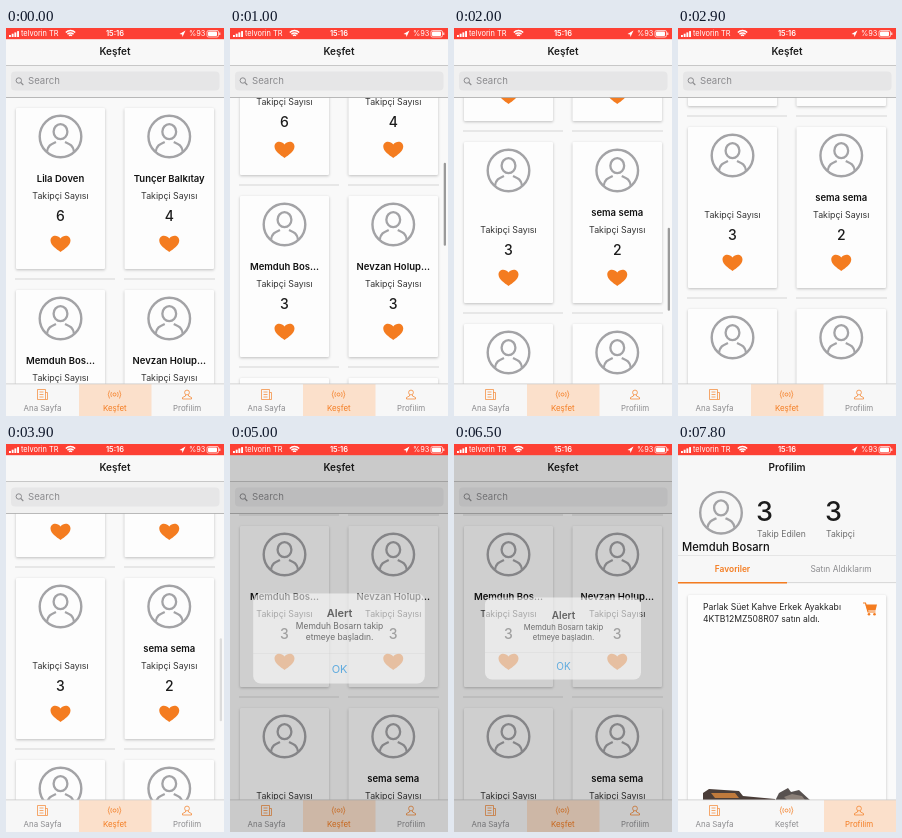
Write an HTML page with a canvas that moves like this. It is 218 px wide and 388 px high and loops after 8 s.

```html
<!DOCTYPE html>
<html lang="tr">
<head>
<meta charset="utf-8">
<title>Keşfet</title>
<style>
html, body { margin: 0; width: 100%; height: 100%; overflow: hidden; background: #f9f9f9; }
canvas { display: block; width: 218px; height: 388px; }
</style>
</head>
<body>
<canvas id="stage"></canvas>
<script>
const W = 218, H = 388, LOOP = 8000, STEP = 100;
const PITCH = 182, CARD_TOP = 80, CARD_H = 161;
const ORANGE = '#f47c20', GRAY = '#8b8b8e', INK = '#1c1c1c', RING = '#a3a3a6';
const SWITCH = 7300;
const USER = 'Memduh Bosarn';

const canvas = document.getElementById('stage');
const c = canvas.getContext('2d');
const ratio = window.devicePixelRatio || 1;
canvas.width = W * ratio;
canvas.height = H * ratio;

const rows = [
  [['Lila Doven', 6], ['Tunçer Balkıtay', 4]],
  [['Memduh Bos...', 3], ['Nevzan Holup...', 3]],
  [['', 3], ['sema sema', 2]],
  [['', 2], ['', 2]],
  [['', 1], ['', 1]]
];

// time, scroll offset
const scrollKeys = [[0, 0], [200, 0], [1000, 94], [1500, 226], [2000, 330], [2400, 345],
  [3100, 345], [3900, 310], [4600, 180], [LOOP, 180]];
const barKeys = [[0, 0], [200, 0], [300, 1], [2500, 1], [2800, 0], [3200, 0], [3400, 0.3],
  [4400, 0.3], [4600, 0], [LOOP, 0]];

const clamp = (v) => Math.min(1, Math.max(0, v));

function segment(keys, t) {
  let i = 0;
  while (i < keys.length - 2 && t >= keys[i + 1][0]) i++;
  return i;
}

function linear(keys, t) {
  const i = segment(keys, t), [t0, a] = keys[i], [t1, b] = keys[i + 1];
  return a + (b - a) * clamp((t - t0) / (t1 - t0));
}

// Hermite curve whose tangents never overshoot the keys
function smooth(keys, t) {
  const slope = (i) => (keys[i + 1][1] - keys[i][1]) / (keys[i + 1][0] - keys[i][0]);
  const tangent = (i) => {
    if (i === 0 || i === keys.length - 1) return 0;
    const a = slope(i - 1), b = slope(i);
    return a * b <= 0 ? 0 : 2 * a * b / (a + b);
  };
  const i = segment(keys, t), [t0, a] = keys[i], [t1, b] = keys[i + 1];
  const d = t1 - t0, u = clamp((t - t0) / d), v = 1 - u;
  return a * v * v * (1 + 2 * u) + b * u * u * (3 - 2 * u) +
    d * u * v * (v * tangent(i) - u * tangent(i + 1));
}

function rect(x, y, w, h, color) {
  c.fillStyle = color;
  c.fillRect(x, y, w, h);
}

function round(x, y, w, h, r, color) {
  c.fillStyle = color;
  c.beginPath();
  c.roundRect(x, y, w, h, r);
  c.fill();
}

function text(s, x, y, size, color, align = 'center', weight = 400) {
  c.font = `${weight} ${size}px Inter, "Open Sans", sans-serif`;
  c.fillStyle = color;
  c.textAlign = align;
  c.textBaseline = 'alphabetic';
  c.fillText(s, x, y + size * 0.36);
}

function path(d, x, y, color, width) {
  const p = new Path2D(d);
  c.save();
  c.translate(x, y);
  if (width) {
    c.strokeStyle = color;
    c.lineWidth = width;
    c.stroke(p);
  } else {
    c.fillStyle = color;
    c.fill(p);
  }
  c.restore();
}

function ring(x, y, rx, color, width, ry = rx) {
  c.strokeStyle = color;
  c.lineWidth = width;
  c.beginPath();
  c.ellipse(x, y, rx, ry, 0, 0, Math.PI * 2);
  c.stroke();
}

function avatar(x, y) {
  ring(x, y, 20.8, RING, 2.4);
  ring(x, y - 4.8, 6.9, RING, 2.3, 7.5);
  path('M-13.5 15C-12.5 8.5 -9 7.5 -4.5 5.5M13.5 15C12.5 8.5 9 7.5 4.5 5.5', x, y, RING, 2.3);
}

function heart(x, y) {
  path('M0 8.5C-4 5.5 -10 2 -10 -3C-10 -8.8 -3 -9.3 0 -5' +
    'C3 -9.3 10 -8.8 10 -3C10 2 4 5.5 0 8.5Z', x, y, ORANGE);
}

function panel(x, y, w, h) {
  c.save();
  c.shadowColor = 'rgba(0,0,0,.24)';
  c.shadowBlur = 3 * ratio;
  c.shadowOffsetY = ratio;
  round(x, y, w, h, 1, '#fdfdfd');
  c.restore();
}

function card(x, y, w, [name, count]) {
  const mid = x + w / 2;
  panel(x, y, w, CARD_H);
  avatar(mid, y + 28.5);
  text(name, mid, y + 70.3, 9.5, '#111', 'center', 600);
  text('Takipçi Sayısı', mid, y + 88, 8.8, '#333');
  text(count, mid, y + 108, 14, INK, 'center', 500);
  heart(mid, y + 135.5);
}

function statusBar() {
  rect(0, 0, W, 11.2, '#fd4034');
  for (let i = 0; i < 4; i++) rect(3 + i * 2.7, 7 - i * 1.3, 1.9, 2 + i * 1.3, '#fff');
  text('telvorin TR', 15, 5.6, 7.4, '#fff', 'left');
  for (const r of [2, 4.3, 6.6]) {
    c.strokeStyle = '#fff';
    c.lineWidth = 1.5;
    c.beginPath();
    c.arc(64.5, 9.2, r, -Math.PI * 0.75, -Math.PI * 0.25);
    c.stroke();
  }
  text('15:16', 109, 5.6, 7.5, '#fff', 'center', 600);
  path('M0 3.5L6 0L3 6.5L2.6 4Z', 173.5, 2.5, '#fff');
  text('%93', 183, 5.6, 7.4, '#fff', 'left');
  c.strokeStyle = '#fff';
  c.lineWidth = 0.7;
  c.beginPath();
  c.roundRect(201, 2.5, 11.5, 6.5, 1.5);
  c.stroke();
  round(202, 3.5, 9, 4.5, 0.8, '#fff');
  rect(213.3, 4.5, 1, 2.5, '#fff');
}

function tabBar(active) {
  rect(0, 356, W, 32, '#f7f7f7');
  rect(active * 73, 356, active === 1 ? 72.5 : 73, 32, '#fbe0cb');
  rect(0, 355.5, W, 0.8, '#c9c9c9');
  ['Ana Sayfa', 'Keşfet', 'Profilim'].forEach((label, i) =>
    text(label, 36.5 + i * 72.3, 380, 7.9, i === active ? ORANGE : GRAY));

  path('M-5 -5H3V5H-5ZM3 -2H5V5H3M-3 -2.5H1M-3 0H1M-3 2.5H1', 36.5, 366.5, ORANGE, 0.65);
  ring(108.5, 366.5, 1.5, ORANGE, 0.8);
  path('M-3 -2.5Q-4.5 0 -3 2.5M3 -2.5Q4.5 0 3 2.5' +
    'M-5 -4Q-7.5 0 -5 4M5 -4Q7.5 0 5 4', 108.5, 366.5, ORANGE, 0.7);
  ring(181, 364.5, 2.4, ORANGE, 0.7);
  path('M-1.5 2V3L-4.5 4.5V6H4.5V4.5L1.5 3V2', 181, 365, ORANGE, 0.7);
}

function explore(t) {
  const scroll = smooth(scrollKeys, t);
  rect(0, 0, W, H, '#f9f9f9');
  rows.forEach((pair, i) => {
    const y = CARD_TOP + i * PITCH - scroll;
    if (y > H || y + PITCH < 60) return;
    card(10, y, 89, pair[0]);
    card(118.5, y, 89.5, pair[1]);
    rect(9, y + 170.5, 100, 1, '#d6d6d6');
    rect(118, y + 170.5, 91, 1, '#d6d6d6');
  });
  const bar = linear(barKeys, t);
  if (bar) round(213.7, 109 + scroll * 0.275, 2.3, 83, 1.1, `rgba(0,0,0,${bar * 0.38})`);

  rect(0, 11, W, 27, '#f8f8f8');
  rect(0, 37, W, 0.8, '#bcbcbc');
  text('Keşfet', 109, 23.3, 10, INK, 'center', 600);
  rect(0, 38, W, 31, '#f1f1f1');
  round(5, 43.5, 208.5, 19, 4, '#e6e6e7');
  ring(12.8, 52.5, 2.7, GRAY, 1);
  path('M0 0L2.5 2.5', 14.8, 54.5, GRAY, 1.1);
  text('Search', 22, 53, 9.6, GRAY, 'left');
  rect(0, 69, W, 0.9, '#b2b2b2');
  tabBar(1);
}

function dialog(t) {
  const enter = clamp((t - 4800) / 400);
  const fade = enter * (1 - clamp((t - 6300) / 400));
  if (!fade) return;
  rect(0, 0, W, H, `rgba(0,0,0,${fade * 0.37})`);
  const scale = 1.2 - 0.2 * enter;
  c.save();
  c.globalAlpha = 1 - (1 - fade) ** 1.4;
  c.translate(109, 194.5);
  c.scale(scale, scale);
  c.translate(-109, -194.5);
  round(31, 153.5, 156, 82, 7, 'rgba(252,252,252,.97)');
  text('Alert', 109.5, 171, 10, '#111', 'center', 600);
  text(USER + ' takip', 109.5, 183.3, 7.7, '#222');
  text('etmeye başladın.', 109.5, 193.3, 7.7, '#222');
  rect(31, 208, 156, 0.5, '#cfcfd1');
  text('OK', 109.5, 222, 10, '#0a84d8');
  c.restore();
}

function cart(x, y) {
  path('M-7 -6H-4.5L-2 3H5.5', x, y, ORANGE, 1.2);
  path('M-4.5 -4.5H7L5.5 1.5H-2.5Z', x, y, ORANGE);
  for (const dx of [-1, 4.5]) {
    c.fillStyle = ORANGE;
    c.beginPath();
    c.arc(x + dx, y + 5.3, 1.3, 0, Math.PI * 2);
    c.fill();
  }
}

function profile() {
  rect(0, 0, W, H, '#fafafa');
  rect(0, 11, W, 128, '#f7f7f7');
  text('Profilim', 109, 23, 10, INK, 'center', 600);
  avatar(43, 68.7);
  for (const [x, label] of [[79, 'Takip Edilen'], [148, 'Takipçi']]) {
    text(3, x + 7.5, 67, 27, INK, 'center', 500);
    text(label, x, 90.3, 8.6, '#6d6d6d', 'left');
  }
  text(USER, 4, 103.3, 11.2, '#111', 'left', 500);
  rect(0, 111, W, 0.7, '#dedede');
  text('Favoriler', 54.5, 125, 8.4, ORANGE, 'center', 600);
  text('Satın Aldıklarım', 163, 125, 8.4, GRAY);
  rect(0, 138.3, W, 0.8, '#cfcfcf');
  rect(0, 138, 109, 1.5, ORANGE);

  panel(10, 151, 198, 240);
  text('Parlak Süet Kahve Erkek Ayakkabı', 25, 163, 8.6, '#222', 'left');
  text('4KTB12MZ508R07 satın aldı.', 25, 175, 8.6, '#222', 'left');
  cart(192, 165);

  path('M0 3L6 -1L36 1L40 6L72 9V11H0Z', 25, 346, '#4a3d38');
  path('M8 3L32 3L36 8L12 8Z', 25, 346, '#c07a3c');
  path('M0 11L4 3L13 -2L16 2L24 0L36 11Z', 97, 346, '#57514f');
  path('M9 7L17 4L27 6L30 10H12Z', 97, 346, '#8b8078');
  tabBar(2);
}

function draw(now) {
  const elapsed = now % LOOP;
  const t = elapsed - elapsed % STEP;
  c.setTransform(ratio, 0, 0, ratio, 0, 0);
  if (t < SWITCH) {
    explore(t);
    dialog(t);
  } else {
    profile();
  }
  statusBar();
}

const start = performance.now();
function tick() {
  draw(performance.now() - start);
  requestAnimationFrame(tick);
}
tick();
</script>
</body>
</html>
```
